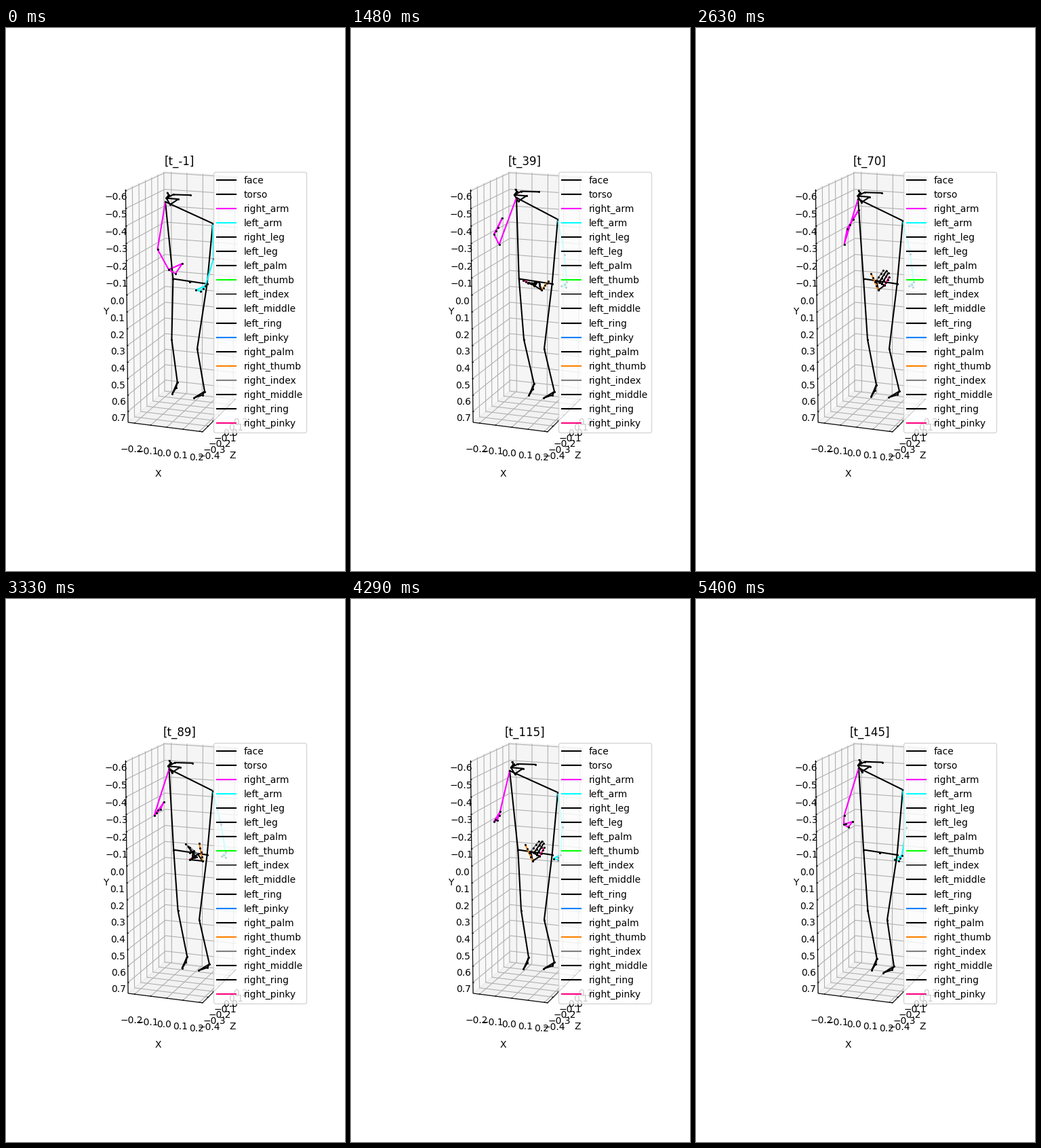
Write a matplotlib script that moves like this. It is 500 px wide and 800 px high and loops after 5.44 s.

```python
import numpy as np
import matplotlib.pyplot as plt
from matplotlib.animation import FuncAnimation
from matplotlib.collections import LineCollection
from matplotlib.lines import Line2D

W, H, DPI = 500, 800, 100
LOOP, TICK = 5440, 20       # ms
N = 147                     # poses per loop
POSE_MS = LOOP / N

fig = plt.figure(figsize=(W / DPI, H / DPI), dpi=DPI, facecolor="white")
ax = fig.add_axes([0, 0, 1, 1])
ax.set(xlim=(0, W), ylim=(H, 0))
ax.axis("off")

# --- perspective box -------------------------------------------------------
SCALE, DIST = 252.4, 2094.6
ORIGIN = np.array([261.5, 399.0])
MID = np.array([-0.0109, 0.0794, -0.0913])
HALF = np.array([58, 173.5, 78]) / SCALE
LO, HI = MID - HALF, MID + HALF
ELEV, AZIM = np.radians([15, 20])
SE, CE, SA, CA = np.sin(ELEV), np.cos(ELEV), np.sin(AZIM), np.cos(AZIM)
VIEW = np.array([[CA, 0, SA],
                 [SE * SA, CE, -SE * CA],
                 [CE * SA, -SE, -CE * CA]])


def project(p):
    x, y, depth = VIEW @ ((np.asarray(p) - MID) * SCALE)
    return ORIGIN + np.array([x, y]) * DIST / (DIST - depth)


def flat(points):
    return np.array([project(p) for p in points])


def put(p, axis, value):
    q = np.array(p, float)
    q[axis] = value
    return q


BACK = np.array([LO[0], HI[1], HI[2]])     # where the three panes meet
FRONT = LO + HI - BACK
for axis, shade in enumerate(("0.95", "0.90", "0.925")):
    u, v = [k for k in range(3) if k != axis]
    far = put(put(BACK, u, FRONT[u]), v, FRONT[v])
    quad = flat([BACK, put(BACK, u, FRONT[u]), far, put(BACK, v, FRONT[v])])
    ax.fill(*quad.T, fc=shade, ec=shade, alpha=0.5, lw=1, zorder=1)

LABEL_PAD, NAME_PAD = 0.0824, 0.179
# name, tick range in tenths, edge, direction of the tick marks
AXES = [("X", range(-2, 3), (0, HI[1], LO[2]), 2),
        ("Y", range(-6, 8), (LO[0], 0, LO[2]), 0),
        ("Z", range(-4, 3), (HI[0], HI[1], 0), 0)]
grid, marks = [], []
for axis, (name, ticks, edge, side) in enumerate(AXES):
    u, v = [k for k in range(3) if k != axis]
    out = put(np.sign(np.array(edge) - MID), axis, 0) * 2 * HALF
    mark = put(np.zeros(3), side, out[side] / 12)
    for n in ticks:
        foot, p = put(BACK, axis, n / 10), put(edge, axis, n / 10)
        grid.append(flat([put(foot, u, FRONT[u]), foot, put(foot, v, FRONT[v])]))
        marks.append(flat([p + 0.1 * mark, p - 0.2 * mark]))
        ax.text(*project(p + out * LABEL_PAD),
                f"{n / 10:.1f}".replace("-", "\u2212"),
                ha="center", va="top", fontsize=10)
    marks.append(flat([put(edge, axis, LO[axis]), put(edge, axis, HI[axis])]))
    ax.text(*project(put(edge, axis, MID[axis]) + out * NAME_PAD), name,
            ha="center", va="center", fontsize=10)
ax.add_collection(LineCollection(grid, colors="#b0b0b0", lw=0.8, zorder=2),
                  autolim=False)
ax.add_collection(LineCollection(marks, colors="black", lw=0.8, zorder=2.1),
                  autolim=False)

# --- legend ----------------------------------------------------------------
MAGENTA, CYAN = "#ff00ff", "#00ffff"
TINTS = {
    "right_arm": MAGENTA, "left_arm": CYAN, "left_thumb": "#00ff00",
    "left_index": "#404040", "left_pinky": "#0080ff",
    "right_thumb": "#ff8000", "right_index": "#808080",
    "right_pinky": "#ff0080",
}
FINGERS = ("palm", "thumb", "index", "middle", "ring", "pinky")
NAMES = ["face", "torso", "right_arm", "left_arm", "right_leg", "left_leg"]
NAMES += [f"{side}_{f}" for side in ("left", "right") for f in FINGERS]
handles = [Line2D([], [], color=TINTS.get(n, "black"), label=n) for n in NAMES]
ax.legend(handles=handles, loc="center right", fontsize=10,
          bbox_to_anchor=(0.125, 202.25 / H, 0.775, 387.5 / H))

# --- motion ----------------------------------------------------------------
STEP = np.arange(N)
KEYS = np.array([0, 17, 40, 71, 90, 116, 146])


def ease(*values):
    """Smooth curve through one value per key step."""
    p = np.array(values, float)
    m = np.gradient(p, KEYS)
    i = np.clip(np.searchsorted(KEYS, STEP, side="right") - 1, 0, len(KEYS) - 2)
    h = KEYS[i + 1] - KEYS[i]
    s = (STEP - KEYS[i]) / h
    return (p[i] + (p[i + 1] - p[i]) * s * s * (3 - 2 * s)
            + h * s * (1 - s) * (m[i] * (1 - s) - m[i + 1] * s))


def at(x, y):
    return np.stack(np.broadcast_arrays(x + 0 * STEP, y + 0 * STEP), axis=-1)


def bump(center, width=11):
    return np.exp(-((STEP - center) / width) ** 2)[:, None, None]


sway = ease(-4, 0, 5, 0, 1.5, -5, 1)        # upper body, sideways
lift = ease(4, 0, -2, 0, -1.5, 1, -3)       # upper body, up and down
reach = ease(0, 0.53, 0.8, 0.9, 1, 0.5, 0.33)   # left arm swinging out
start, end = np.exp(-STEP / 7), np.exp((STEP - N + 1) / 7)
bob = 1.5 * np.cos(2 * np.pi * (STEP - 14) / 39)

J = {
    "rs": at(239 + sway, 252 + lift),
    "ls": at(305, 284 + lift),
    "rh": at(247 + 0.15 * sway, 369.5),
    "lh": at(296.6, 377),
    "rk": at(253 - 7 * start + 0.4 * sway, 459),
    "ra": at(266 - 10 * start + 0.8 * sway, 522 + 8 * STEP / N),
    "lk": at(285 - 3 * start - 3 * end, 472.5),
    "la": at(300 - 7 * start - 8 * end, 536.5 + bob + 6 * end),
    "re": at(218.5 + 5 * start, 319 + 7 * start),
    "rw": at(ease(240, 201, 211, 223, 222, 211, 218),
             ease(356, 319, 304, 296, 315, 328, 332)),
    "ri": at(ease(260, 210, 223, 240, 233, 220, 231),
             ease(347, 294, 280, 268, 299, 313, 328)),
    "le": at(306 + 11 * reach, 340 - 8 * reach),
    "lw": at(294 + 30 * reach, 380 - 7 * reach),
}
lean = J["ri"] - J["rw"]
J["rp"] = J["rw"] + lean / 2 + at(0, 0.17 * (J["rw"][:, 1] - 295))
J["rt"] = J["rw"] + 0.22 * lean
J["li"] = J["lw"] + at(8 * reach - 14, 6)
J["lp"] = J["lw"] + at(7 * reach - 7, 8)
J["lt"] = J["lw"] + (-3, 4)
J["ear"] = at(274 + 0.5 * sway, 243 + 0.8 * lift)
for name, base, dx, dy in (
        ("brow", "ear", -34, -3.5), ("lid", "ear", -32, -0.5),
        ("eye", "ear", -25.5, -0.8), ("nose", "ear", -35.5, 4.5),
        ("mouth_l", "ear", -18, 6), ("mouth_r", "ear", -30, 14),
        ("r_heel", "ra", -2, 8), ("r_toe", "ra", -7.5, 17),
        ("l_heel", "la", -3, 5), ("l_toe", "la", -15.5, 9.3)):
    J[name] = J[base] + (dx, dy)

# wrist, thumb tip, first and last knuckle, first and last fingertip
OPEN = np.array([(268, 386), (257, 362), (265, 372), (278.5, 379),
                 (277, 357), (285, 366)])
CURLED = np.array([(281, 386), (291, 373), (277, 374), (266, 377),
                   (279, 383), (254, 372)])
TURNED = np.array([(290, 386), (285, 360), (283, 376), (271, 384),
                   (265, 361), (281, 380)])
REST = np.array([271.0, 374.0])
hand = OPEN + bump(40) * (CURLED - OPEN) + bump(90) * (TURNED - OPEN)
hand[(STEP < 6) | (STEP > 137)] = REST      # hand not seen


def span(u, v, n):
    return u + (v - u) * np.linspace(0, 1, n)[:, None]


def hand_lines(pose):
    wrist, thumb, k0, k1, t0, t1 = pose
    knuckles, tips = span(k0, k1, 4), span(t0, t1, 4)
    tips[1:3] += 0.2 * (tips - knuckles)[1:3]
    palm = np.vstack([wrist, knuckles, wrist])
    return [palm, span(wrist, thumb, 5)] + [span(k, t, 4)
                                            for k, t in zip(knuckles, tips)]


BODY = [
    ("black", "brow lid nose eye ear"),
    ("black", "nose mouth_l mouth_r nose"),
    ("black", "rs ls lh rh rs"),
    (MAGENTA, "rs re rw rp ri rw rt"),
    (CYAN, "ls le lw lp li lw lt"),
    ("black", "rh rk ra r_heel r_toe ra"),
    ("black", "lh lk la l_heel l_toe la"),
]


def limb(color):
    return ax.plot([], [], color=color, lw=1.5, zorder=3)[0]


body = [(limb(color), names.split()) for color, names in BODY]
digits = [limb(TINTS.get(f"right_{f}", "black")) for f in FINGERS]
dots, = ax.plot([], [], "o", color="black", ms=2.2, mew=0, zorder=4)
title = ax.text(256.25, 201.9, "", ha="center", va="baseline", fontsize=12)


def draw(k):
    i = int((k + 0.65) * TICK / POSE_MS)    # nearest pose change
    title.set_text(f"[t_{i - 1}]")
    for line, names in body:
        line.set_data(*np.array([J[n][i] for n in names]).T)
    chains = hand_lines(hand[i])
    for line, pts in zip(digits, chains):
        line.set_data(*pts.T)
    joints = [p[i] for p in J.values()] + [REST]
    dots.set_data(*np.vstack([joints] + chains).T)
    return [title, dots, *digits, *(line for line, _ in body)]


anim = FuncAnimation(fig, draw, frames=LOOP // TICK, interval=TICK,
                     repeat=True, repeat_delay=0, cache_frame_data=False)
plt.show()
```
